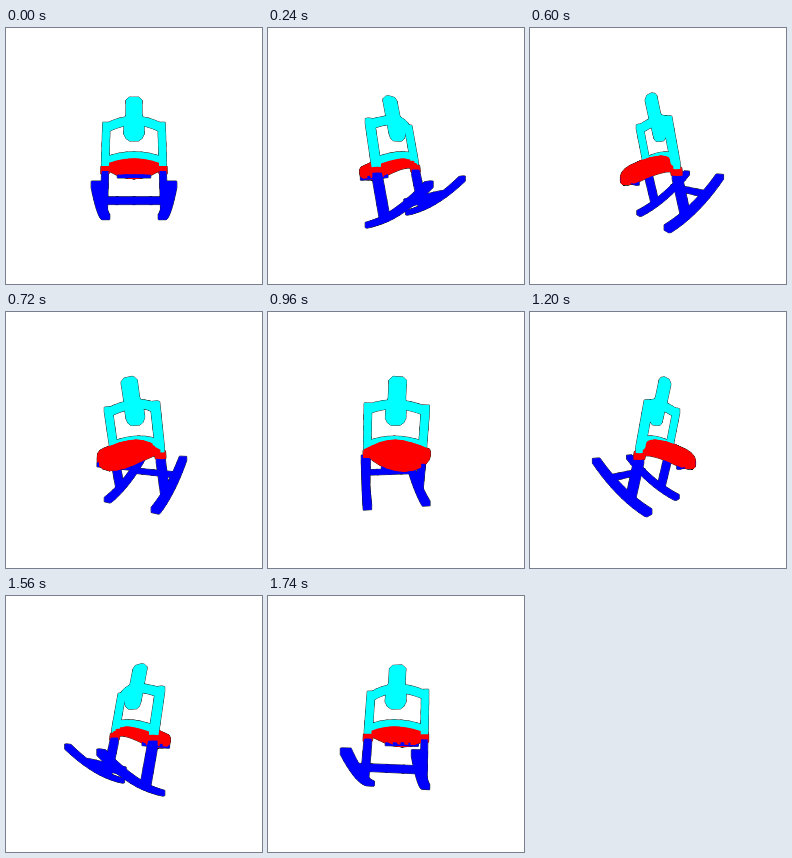
Recreate the animation shown at these times as an HTML page with a canvas. Size 256 by 256 pixels, loop 1800 ms.

```html
<!DOCTYPE html>
<html>
<head>
<meta charset="utf-8">
<style>
html, body { margin: 0; width: 100%; height: 100%; overflow: hidden; background: #fff; }
canvas { display: block; width: 256px; height: 256px; }
</style>
</head>
<body>
<canvas id="stage" width="256" height="256"></canvas>
<script>
const ctx = document.getElementById('stage').getContext('2d');
const CYAN = '#0ff', RED = '#f00', BLUE = '#00f';
const CAMERA = 218, STEP_MS = 60, STEPS = 30;
const pieces = [];

// A box is [x, y, z, half width, half height, half depth]; y points down, z to the chair's back.
function corners([x, y, z, hx, hy, hz]) {
  const out = [];
  for (const i of [-1, 1]) for (const j of [-1, 1]) for (const k of [-1, 1])
    out.push([x + i * hx, y + j * hy, z + k * hz]);
  return out;
}

// Each piece is the convex hull of its boxes.
function addPiece(color, boxes) {
  const mid = [0, 1, 2].map(a => boxes.reduce((s, b) => s + b[a], 0) / boxes.length);
  pieces.push({ color, mid, points: boxes.flatMap(corners) });
}

function chain(color, boxes) {
  for (let i = 1; i < boxes.length; i++) addPiece(color, [boxes[i - 1], boxes[i]]);
}

function sample(n, fn) {
  return Array.from({ length: n + 1 }, (_, i) => fn(i / n));
}

function buildBack() {
  chain(CYAN, [
    [0, -59, -8, 5, 1.5, 2], [0, -56, -8, 8.2, 1.5, 2], [0, -40, -4, 8.2, 1.5, 2],
    [0, -34, -1, 10, 1.5, 2], [0, -23, 2, 10, 1.5, 2], [0, -19, 2, 8, 1.5, 2],
    [0, -16.5, 2, 4.5, 1.5, 2]
  ]);
  // top rail, then the bowed lower rail
  chain(CYAN, sample(8, t => {
    const u = 2 * t - 1, rise = 1 - u * u;
    return [28 * u, -29 - 6.5 * rise, -7 + 6 * rise, 1, 4, 2];
  }));
  chain(CYAN, sample(8, t => {
    const u = 2 * t - 1, rise = 1 - u * u;
    return [28 * u, 4.5 - 5.5 * rise, 2 + 6.5 * rise, 1, 3, 1.8];
  }));
}

function buildSide(s) {
  chain(CYAN, sample(4, t => [s * 28.5, -32 + 41 * t, -7 + 9 * t, 3.4, 2.5, 2.3]));
  chain(RED, [[s * 28.5, 11.5, 2, 3.8, 1.5, 3.5], [s * 28.5, 16, 3, 3.8, 1.5, 3.5]]);
  chain(BLUE, sample(3, t => [s * 28.5, 18 + 34 * t, 3 + 9 * t, 3, 3, 3]));
  chain(BLUE, sample(10, t => [
    s * (29 - 1.5 * t), 63 - 42 * t + 20 * t * (1 - t), -7 + 64 * t, 3.9, 2.4, 1.3
  ]));
}

function seatBox(u, v) {
  const t = Math.sin(v * Math.PI / 2);
  const crown = 11 * (1 - u * u) * (1 - t) ** 1.5;
  return [31 * u * Math.sqrt(1 - t ** 3), 13 - 14 * t + 25 * t * t - crown, 4 - 40 * t, 0.8, 2.4, 0.8];
}

function buildSeat() {
  const nu = 8, nv = 8;
  for (let i = 0; i < nu; i++) for (let j = 0; j < nv; j++) {
    const u0 = 2 * i / nu - 1, u1 = u0 + 2 / nu, v0 = j / nv, v1 = (j + 1) / nv;
    addPiece(RED, [seatBox(u0, v0), seatBox(u1, v0), seatBox(u0, v1), seatBox(u1, v1)]);
  }
}

buildBack();
buildSide(-1);
buildSide(1);
buildSeat();
chain(BLUE, sample(4, t => [-18 + 36 * t, 23, -31, 1, 2, 1.5]));
chain(BLUE, sample(4, t => [-28 + 56 * t, 37, 37, 1, 2.8, 2.5]));

function hull(points) {
  points.sort((a, b) => a[0] - b[0] || a[1] - b[1]);
  const half = list => {
    const out = [];
    for (const p of list) {
      while (out.length > 1) {
        const [a, b] = out.slice(-2);
        if ((b[0] - a[0]) * (p[1] - a[1]) > (b[1] - a[1]) * (p[0] - a[0])) break;
        out.pop();
      }
      out.push(p);
    }
    return out.slice(0, -1);
  };
  return [...half(points), ...half([...points].reverse())];
}

function draw(angle) {
  const c = Math.cos(angle), s = Math.sin(angle);
  const depth = ([x, y, z]) => z * c - x * s;
  const project = p => {
    const scale = CAMERA / (CAMERA - depth(p));
    return [128 + (p[0] * c + p[2] * s) * scale, 128 + p[1] * scale];
  };
  const shapes = pieces.map(({ color, mid, points }) => {
    const path = new Path2D();
    hull(points.map(project)).forEach(([x, y]) => path.lineTo(x, y));
    path.closePath();
    return { color, path, d: depth(mid) };
  }).sort((a, b) => a.d - b.d);

  ctx.fillStyle = '#fff';
  ctx.fillRect(0, 0, 256, 256);
  // thin dark rim around the silhouette
  ctx.strokeStyle = '#000';
  ctx.lineWidth = 0.8;
  ctx.lineJoin = 'round';
  for (const { path } of shapes) ctx.stroke(path);
  for (const { color, path } of shapes) {
    ctx.fillStyle = color;
    ctx.fill(path);
  }
}

const start = performance.now();
function tick() {
  const step = Math.floor((performance.now() - start) / STEP_MS) % STEPS;
  draw(step * 2 * Math.PI / STEPS);
  requestAnimationFrame(tick);
}
tick();
</script>
</body>
</html>
```
